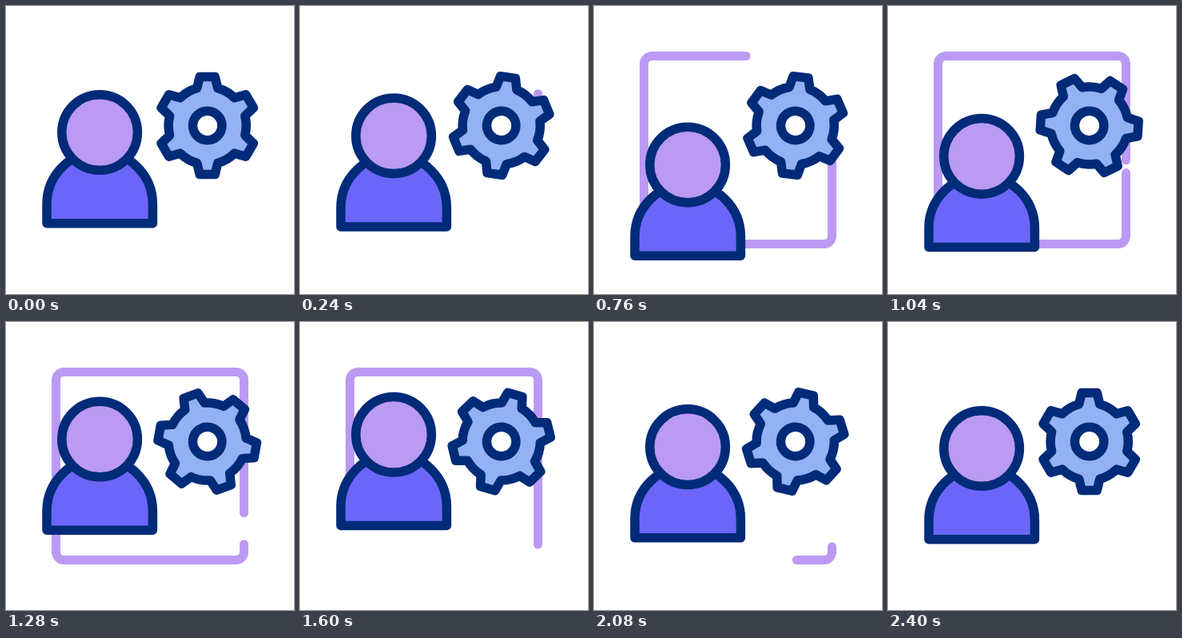
An HTML page for the animation above (2.48 s loop, 360 px wide and 360 px high).

```html
<!DOCTYPE html>
<html lang="en">
<head>
<meta charset="utf-8">
<title>User settings</title>
<style>
  html, body { margin: 0; width: 100%; height: 100%; overflow: hidden; background: #fff; }
  svg { display: block; width: 100%; height: 100%; }
  .ink { stroke: #002b78; stroke-width: 11.5; stroke-linecap: round; stroke-linejoin: round; }
</style>
</head>
<body>
<svg viewBox="0 0 360 360">
  <path id="frame" fill="none" stroke="#ba9af2" stroke-width="11" stroke-linecap="round"/>
  <g id="person" class="ink">
    <path fill="#6b66f9" d="M51 271.7V248A66.2 66.2 0 0 1 183.4 248V271.7Z"/>
    <circle fill="#ba9af2" cx="117.1" cy="158" r="47.3"/>
  </g>
  <g id="gear" class="ink">
    <path id="cog" fill="#93b2f4"/>
    <circle fill="#fff" r="18.2"/>
  </g>
</svg>
<script>
const LOOP = 2480, STEP = 40, LAST = 2400;
const $ = id => document.getElementById(id);
const clamp = x => Math.min(1, Math.max(0, x));
const span = (t, a, b) => clamp((t - a) / (b - a));
const sine = x => (1 - Math.cos(Math.PI * x)) / 2;

// cubic-bezier(a, 0, b, 1)
function bezier(a, b) {
  return x => {
    let lo = 0, hi = 1;
    for (let i = 0; i < 24; i++) {
      const s = (lo + hi) / 2, r = 1 - s;
      if (3 * r * r * s * a + 3 * r * s * s * b + s * s * s < x) lo = s; else hi = s;
    }
    return lo * lo * (3 - 2 * lo);
  };
}
const glide = bezier(0.65, 0.1);
const draw = bezier(0.75, 0.356);

// start, end, from, to
const BOB = [[40, 785, 0, 40.5], [785, 1585, 40.5, -17.2], [1585, 2400, -17.2, 0]];
const TURN = [[20, 1245, 0, 100.5], [1245, 2330, 100.5, 0]];

function track(keys, t, ease) {
  const [a, b, from, to] = keys.find(k => t < k[1]) || keys[keys.length - 1];
  return from + (to - from) * ease(span(t, a, b));
}

// Rounded square, traced twice so the stroke can run past its start
const SIDE = 215, R = 10, ROUND = 4 * SIDE + 2 * Math.PI * R;
const corner = (x, y) => `a${R} ${R} 0 0 1 ${x} ${y}`;
const lap = `v${SIDE}${corner(-R, R)}h${-SIDE}${corner(-R, -R)}v${-SIDE}${corner(R, -R)}h${SIDE}${corner(R, R)}`;
$('frame').setAttribute('d', 'M297.5 72.5' + lap + lap);

function cogPath() {
  const pts = [[-13, -46.8], [-9.5, -61], [9.5, -61], [13, -46.8]];
  let d = '';
  for (let i = 0; i < 6; i++) {
    const c = Math.cos(i * Math.PI / 3), s = Math.sin(i * Math.PI / 3);
    pts.forEach(([x, y], j) => {
      const cmd = j ? 'L' : i ? 'A48.6 48.6 0 0 1 ' : 'M';
      d += `${cmd}${(x * c - y * s).toFixed(2)} ${(x * s + y * c).toFixed(2)}`;
    });
  }
  return d + 'A48.6 48.6 0 0 1 -13 -46.8Z';
}
$('cog').setAttribute('d', cogPath());

function render(t) {
  $('person').setAttribute('transform', `translate(0 ${track(BOB, t, glide)})`);
  $('gear').setAttribute('transform', `translate(251.7 149.5) rotate(${track(TURN, t, sine)})`);

  const head = draw(span(t, 0, 1200));
  const tail = sine(span(t, 1130, 2260));
  const len = (head - tail) * ROUND;
  const line = $('frame');
  line.style.display = len > 0.5 ? '' : 'none';
  line.setAttribute('stroke-dasharray', `${Math.max(len, 0.01)} 5000`);
  line.setAttribute('stroke-dashoffset', -(7.6 + 0.1235 * t + tail * ROUND));
}

let begin;
function tick(now) {
  begin ??= now;
  const t = (now - begin) % LOOP;
  render(Math.min(LAST, Math.floor(t / STEP) * STEP));
  requestAnimationFrame(tick);
}
render(0);
requestAnimationFrame(tick);
</script>
</body>
</html>
```
